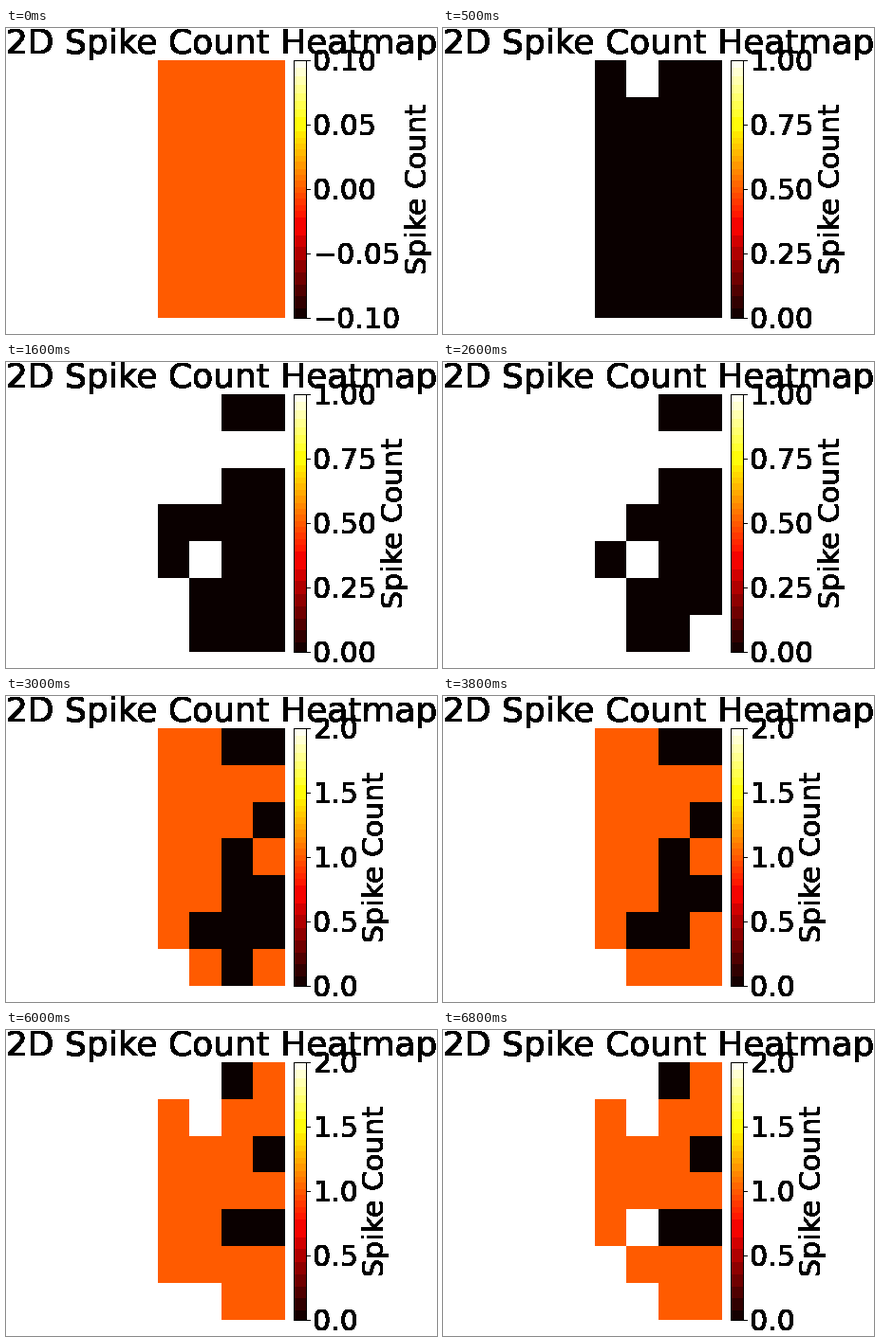
A matplotlib script that plays this animation: 454x323 px, repeating every 8 s.

```python
import matplotlib.pyplot as plt
import numpy as np
from matplotlib.animation import FuncAnimation
from matplotlib.cm import ScalarMappable
from matplotlib.colors import ListedColormap, Normalize

WIDTH, HEIGHT, DPI = 454, 323, 72
STEP_MS, LOOP_MS = 100, 8000
ROWS, COLS = 7, 4
DOWN, RIGHT, DOWN_LEFT = (1, 0), (0, 1), (1, -1)

plt.rcParams.update({"font.family": "DejaVu Sans", "font.size": 30})


def wave(start, row, col, heading, size=2, gap=STEP_MS, stride=1):
    """Spikes (time, row, column) of activity travelling over the grid."""
    return [(start + i * gap, row + i * stride * heading[0], col + i * stride * heading[1])
            for i in range(size)]


def spike(start, row, col):
    return wave(start, row, col, DOWN, size=1)


SPIKES = (
    wave(500, 0, 1, DOWN, size=3)
    + wave(700, 5, 0, DOWN)
    + wave(1000, 0, 0, DOWN, size=3)
    + spike(1300, 4, 1)
    + wave(1500, 1, 2, RIGHT)
    + spike(1800, 6, 3)
    + wave(2600, 3, 0, DOWN, gap=200)
    + wave(2800, 2, 2, DOWN_LEFT)
    + wave(2900, 6, 0, RIGHT, size=3)
    + wave(3000, 3, 3, DOWN, gap=800, stride=2)
    + wave(4400, 0, 0, RIGHT, gap=1000)
    + wave(4800, 3, 2, DOWN, gap=400, stride=2)
    + wave(4900, 5, 1, DOWN)
    + spike(5200, 1, 1)
    + spike(6000, 0, 3)
    + wave(6700, 4, 1, DOWN_LEFT)
)


def counts_at(ms):
    counts = np.zeros((ROWS, COLS))
    for time, row, col in SPIKES:
        counts[row, col] += time <= ms
    return counts


def banded(cmap):
    """Average neighbouring colours into coarse RGB bins."""
    colors = cmap(np.arange(cmap.N))[:, :3]
    bins = colors * 255 // [32, 16, 32]
    return ListedColormap([colors[(bins == b).all(axis=1)].mean(axis=0) for b in bins])


def hard_edges(image, dpi):
    """Turn every touched pixel solid black."""
    solid = np.zeros_like(image)
    solid[..., 3] = image[..., 3] > 0
    return solid, 0, 0


def pixel_axes(left, top, right, bottom):
    return fig.add_axes([left / WIDTH, 1 - bottom / HEIGHT,
                         (right - left) / WIDTH, (bottom - top) / HEIGHT])


fig = plt.figure(figsize=(WIDTH / DPI, HEIGHT / DPI), dpi=DPI, facecolor="white")
ax = pixel_axes(160, 33.8, 294, 305.8)
cax = pixel_axes(302.8, 33.8, 316.4, 305.8)

hot = plt.get_cmap("hot")
norm = Normalize(-0.1, 0.1)
heatmap = ax.imshow(counts_at(0), cmap=hot, norm=norm, aspect="auto",
                    interpolation="nearest")
ax.set_axis_off()
ax.set_title("2D Spike Count Heatmap", fontsize=36)
colorbar = fig.colorbar(ScalarMappable(norm, banded(hot)), cax=cax)
colorbar.set_label("Spike Count")
for artist in (ax.title, cax.yaxis, colorbar.outline):
    artist.set_agg_filter(hard_edges)


def update(frame):
    counts = counts_at(frame * STEP_MS)
    peak = counts.max()
    low, high = (0, peak) if peak else (-0.1, 0.1)
    heatmap.set_data(counts)
    heatmap.set_clim(low, high)
    decimals = 1 if peak > 1 else 2
    ticks = np.linspace(low, high, 5)
    labels = [f"{tick:.{decimals}f}".replace("-", "\N{MINUS SIGN}") for tick in ticks]
    colorbar.set_ticks(ticks, labels=labels)
    return [heatmap]


animation = FuncAnimation(fig, update, frames=LOOP_MS // STEP_MS,
                          interval=STEP_MS, repeat=True, repeat_delay=0, blit=False)
plt.show()
```
